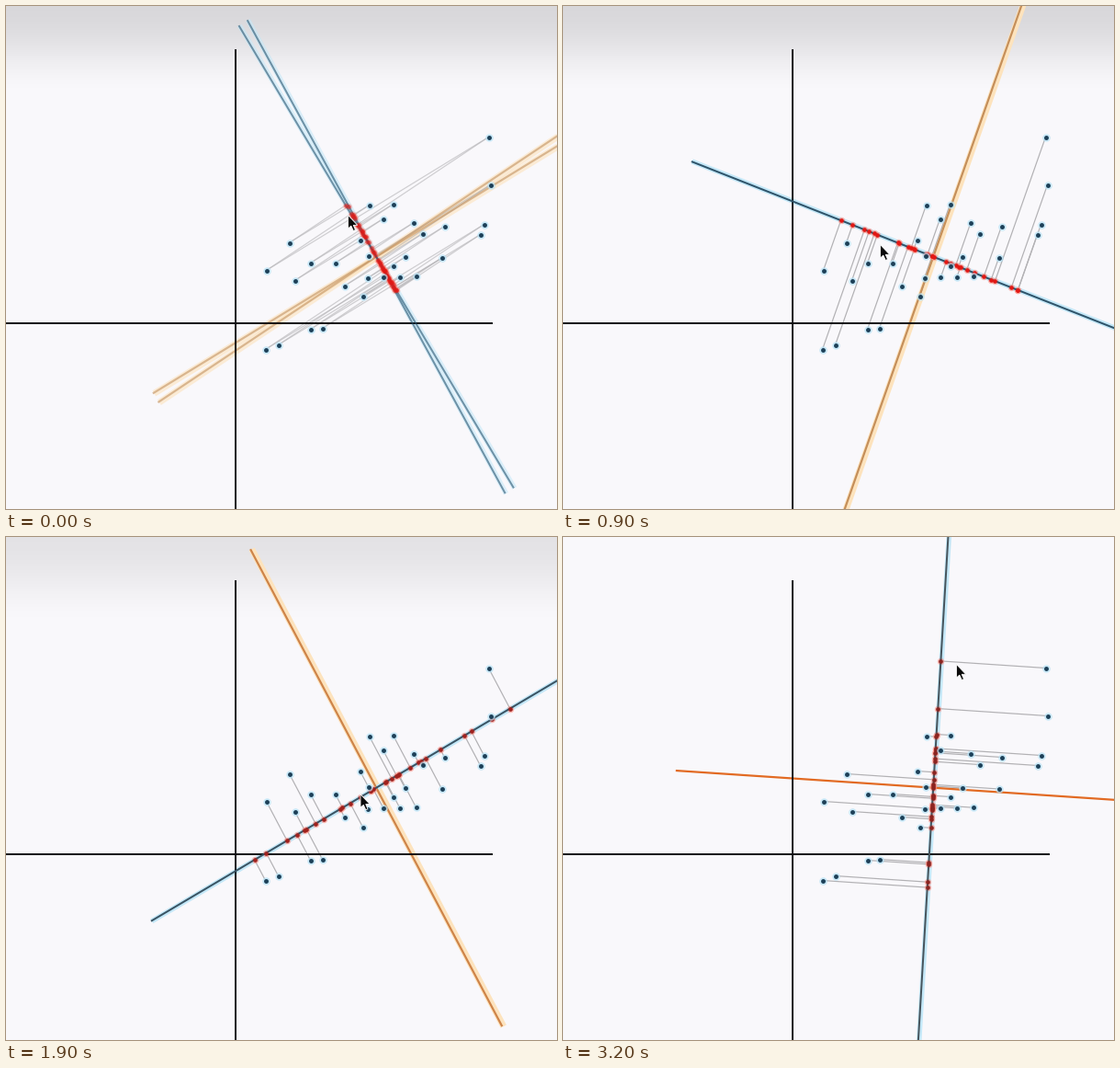
Animation of 600x547 px, one loop 3300 ms. Source, as a matplotlib script:

```python
import numpy as np
import matplotlib.pyplot as plt
from matplotlib.animation import FuncAnimation
from matplotlib.collections import LineCollection
from matplotlib.colors import to_rgb
from matplotlib.patches import Polygon

W, H, DPI = 600, 547, 100
FRAMES, STEP = 33, 100
CENTER = np.array([403.7, 273.2])
STRETCH = 1.058          # the plot is slightly taller than wide
REACH = 281              # half length of both rotating lines


def row(x, y, dx, dy, n):
    return [(x + dx * k, y + dy * k) for k in range(n)]


# scattered points, then the ones that fall into loose rows
POINTS = np.array(
    [(526, 143), (528, 195), (521, 238), (517, 249), (396, 217), (422, 216),
     (454, 248), (386, 255), (422, 283), (389, 316), (369, 305), (359, 280),
     (332, 280), (309, 258), (284, 288), (315, 299)]
    + row(411, 232, 33.5, 4, 3)
    + row(395, 272.5, 40, 1, 3)
    + row(394, 296.5, 17.7, -0.6, 4)
    + row(283, 374, 49, -22, 2)
    + row(297, 369, 48, -18, 2))
DATA = (POINTS - CENTER) / (1, -STRETCH)

# mouse tip on the way, (frame, x, y)
MOUSE = [(0, 373, 228), (5, 334, 217), (9, 346, 260), (16, 315.5, 307),
         (22, 457.5, 253.5), (27, 472, 161), (32, 429, 139)]
ARROW = np.array([(0, 0), (0, 14.5), (3.3, 11.6), (5.8, 17), (8, 16),
                  (5.7, 10.8), (10.2, 10.8)])


def px(n):
    return n * 72 / DPI


def ramp(i, start, end):
    return float(np.clip((i - start) / (end - start), 0, 1))


def mix(a, b, t):
    return tuple(np.array(to_rgb(a)) * (1 - t) + np.array(to_rgb(b)) * t)


def angle_at(i):
    """Steady turn that runs a little faster in the middle."""
    return -60 + 4.4 * i + 5.6 * ramp(i, 9, 16)


def to_screen(vec):
    return CENTER + vec * (1, -STRETCH)


fig = plt.figure(figsize=(W / DPI, H / DPI), dpi=DPI, facecolor="#f9f8fb")
ax = fig.add_axes([0, 0, 1, 1])
ax.axis("off")

# soft shadow along the top
rows = np.arange(H)
shadow = np.zeros((H, 1, 4))
shadow[:, 0, 3] = np.where(rows < 100, 0.13 * np.cos(np.pi / 2 * rows / 100) ** 2, 0)
top = ax.imshow(shadow, extent=(0.5, W + 0.5, H + 0.5, 0.5), aspect="auto",
                interpolation="nearest", zorder=0)
ax.set_xlim(0.5, W + 0.5)
ax.set_ylim(H + 0.5, 0.5)


def stroke(color, width, z, x=(), y=()):
    return ax.plot(x, y, color=color, lw=px(width), zorder=z,
                   solid_capstyle="butt")[0]


def dots(color, size, z, alpha=1):
    return ax.scatter(*POINTS.T, s=px(size) ** 2, color=color, lw=0,
                      zorder=z, alpha=alpha)


class Pose:
    """Rotating pair of lines with the projected points."""

    def __init__(self):
        self.links = LineCollection([], colors="#b2b1b4", lw=px(1.2), zorder=2)
        ax.add_collection(self.links)
        self.orange_glow = stroke("#fde3bd", 7, 1)
        self.orange = stroke("k", 2.2, 3)
        self.blue_glow = stroke("#c4e8f8", 5.5, 1.2)
        self.blue = stroke("k", 2, 5)
        self.red_glow = dots("#ff8a7c", 7.5, 4)
        self.red = dots("r", 4.6, 6)
        self.parts = [self.links, self.orange_glow, self.orange, self.blue_glow,
                      self.blue, self.red_glow, self.red]

    def show(self, on):
        for part in self.parts:
            part.set_visible(on)

    def place(self, i, strength):
        a = np.radians(angle_at(i))
        along = np.array([np.cos(a), np.sin(a)])
        across = np.array([-along[1], along[0]])
        ends = np.array([[-REACH], [REACH]])

        x, y = to_screen(ends * along).T
        self.blue.set_data(x, y)
        self.blue_glow.set_data(x + 0.8, y)
        x, y = to_screen(ends * across).T
        self.orange.set_data(x, y)
        self.orange_glow.set_data(x + 1.5, y)

        feet = to_screen(np.outer(DATA @ along, along))
        self.links.set_segments(np.stack([POINTS, feet], axis=1))
        self.red.set_offsets(feet)
        self.red_glow.set_offsets(feet)

        t = i / (FRAMES - 1)
        self.blue.set_color(mix("#25536f", "#47555d", t))
        self.orange.set_color(mix("#c3925f", "#e26a22", t * t))
        self.red.set_color(mix("#e21814", "#8c2420", ramp(i, 9, 22)))
        for part in self.parts:
            part.set_alpha(strength)
        self.red_glow.set_alpha(0.55 * strength)
        self.orange_glow.set_alpha((1 - ramp(i, 20, 27)) * strength)


main, echo = Pose(), Pose()

dots("#b5e2f6", 8.5, 7, 0.7)
dots("#1d4058", 4.9, 8)
stroke("#111114", 2, 4.5, (250.4, 250.4), (47, H + 1))
stroke("#111114", 2, 4.5, (0, 530), (345.4, 345.4))
stroke("#9c9c9c", 1, 9, (W, W), (0, H + 1))
mouse = Polygon(ARROW, closed=True, fc="#0a0a0a", ec="white", lw=px(0.8), zorder=10)
ax.add_patch(mouse)


def draw(i):
    blended = i == 0     # the loop opens on two overlapping poses
    main.place(i, 0.6 if blended else 1)
    echo.place(i + 0.5, 0.6)
    echo.show(blended)
    top.set_alpha(1 - ramp(i, 18, 21))
    when, x, y = zip(*MOUSE)
    mouse.set_xy(ARROW + (np.interp(i, when, x), np.interp(i, when, y)))
    return []


anim = FuncAnimation(fig, draw, frames=FRAMES, interval=STEP, repeat=True,
                     repeat_delay=0, blit=False)
plt.show()
```
